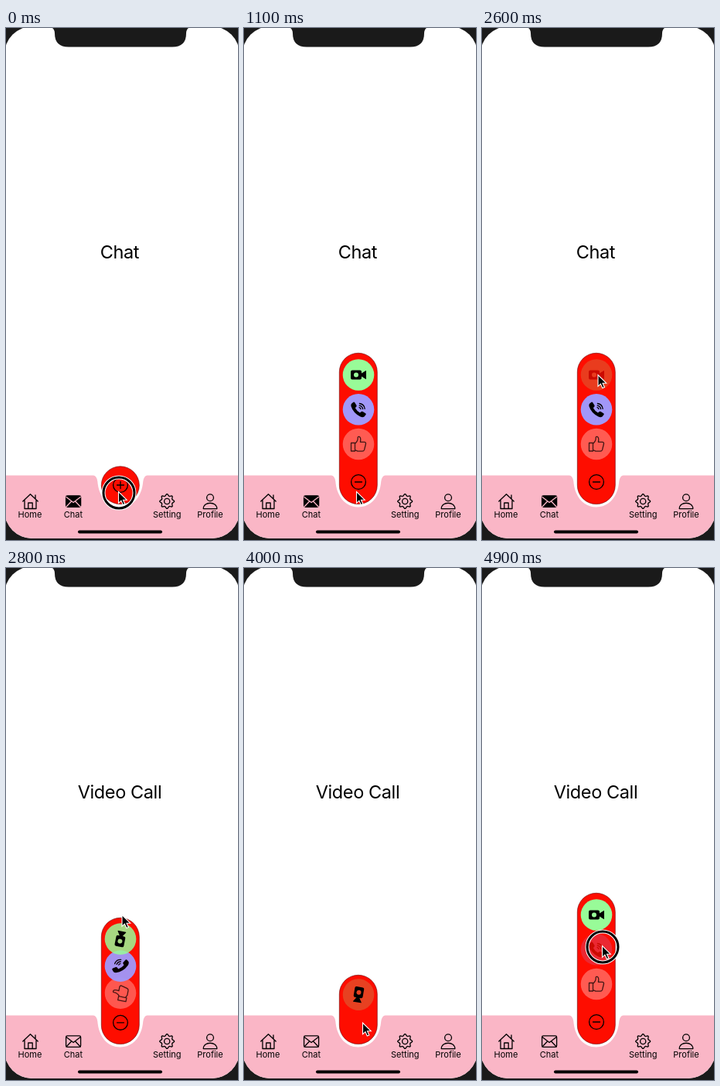
Recreate the animation shown at these times as an HTML page. Size 300x662 px, loop 5000 ms.

```html
<!DOCTYPE html>
<html lang="en">
<head>
<meta charset="utf-8">
<title>Expanding tab bar</title>
<style>
html, body { margin: 0; width: 100%; height: 100%; overflow: hidden; background: #1a1a1a; }
svg { display: block; width: 300px; height: 662px; font-family: Inter, sans-serif; text-anchor: middle; }
.line { fill: none; stroke: #000; stroke-width: 1.3; stroke-linejoin: round; stroke-linecap: round; }
.tab { font-size: 11px; }
#title { font-size: 23.5px; letter-spacing: -.4px; }
</style>
</head>
<body>
<svg viewBox="0 0 300 662">
  <defs>
    <clipPath id="screen"><rect x="-2" y="-2" width="304" height="662" rx="36"/></clipPath>
    <clipPath id="pillClip"><rect class="pill" x="123.3" width="49" rx="24.5"/></clipPath>
    <g id="camera">
      <path fill-rule="evenodd" d="M-8-6H2Q4-6 4-4V-2L9.5-5.5Q10-5.5 10-5V5Q10 5.5 9.5 5.5L4 2V4Q4 6 2 6H-8Q-10 6-10 4V-4Q-10-6-8-6ZM-3-3A3 3 0 0 0-3 3A3 3 0 0 0-3-3Z"/>
    </g>
    <g id="phone">
      <path d="M-9-7.5L-6.5-9.6Q-5.5-10-4.8-9L-2.6-5.6Q-2-4.5-2.8-3.6L-4.2-2Q-2 2.2 2 4.2L3.7 2.8Q4.6 2 5.6 2.7L9.2 5Q10.2 5.8 9.5 6.8L7.5 9.2Q5.5 10.5 2.5 9.2Q-6.5 5-9.5-4Q-10-6.3-9-7.5Z"/>
      <path class="line" d="M1-2.6Q2.6-2.2 3-.6M1.2-5.2Q5-4.5 5.6-.8M1.4-7.8Q7.4-7 8.2-1"/>
    </g>
    <g id="thumb" class="line" opacity=".75">
      <path d="M-9.5-1.5H-4.5V9H-9.5ZM-4.5-.5Q-.5-4-.8-8.5Q-.6-10 1-9.6Q3.6-8.6 2.4-2.6H8Q10-2.2 9.4 0L7.6 7.4Q7 9.2 5 9.2H-1L-4.5 7.6"/>
    </g>
  </defs>

  <g clip-path="url(#screen)">
    <rect x="-2" y="-2" width="304" height="664" fill="#fff"/>
    <path fill="#fab6c6" d="M-2 578.5H113Q117 578.5 118.3 586C120 607 132 619.5 147.8 619.5S175.6 607 177.3 586Q178.6 578.5 182.6 578.5H302V662H-2Z"/>
    <path fill="#1a1a1a" d="M56-2Q63 0 63 7Q63 24.5 81 24.5H215Q233 24.5 233 7Q233 0 240-2Z"/>
  </g>
  <text id="title" x="147" y="298"></text>

  <g class="line">
    <path d="M21.8 612L31.5 602.8L41.2 612M24 610.5V621.5H39V610.5M28.8 621.5V614H34.2V621.5M38 604V608"/>
    <g id="mail">
      <rect x="77.6" y="604.8" width="19" height="14.6" rx="1.8"/>
      <path id="flap" d="M78 606.5L87.1 613.5L96.2 606.5M78 619L84.6 612M96.2 619L89.6 612"/>
    </g>
    <path id="gear"/>
    <circle cx="208.2" cy="612" r="3.6"/>
    <circle cx="264" cy="607.2" r="4.4"/>
    <path d="M255.2 621.6C255.2 611.8 272.8 611.8 272.8 621.6Z"/>
  </g>
  <g class="tab">
    <text x="31" y="633">Home</text>
    <text x="87" y="633">Chat</text>
    <text x="208.3" y="633">Setting</text>
    <text x="264" y="633">Profile</text>
  </g>
  <rect x="93" y="649.5" width="109" height="4" rx="2"/>

  <rect class="pill" x="123.3" width="49" rx="24.5" fill="#fe0d00" stroke="#600" stroke-width=".6"/>
  <g clip-path="url(#pillClip)">
    <g id="minus" class="line" stroke-width="1.5"><circle r="9.4"/><path d="M-4.5 0H4.5"/></g>
    <g id="item2"><circle r="20.3" fill="#fff" opacity=".32"/><use href="#thumb"/></g>
    <g id="item1"><circle r="20.3" fill="#a197f8"/><use href="#phone"/></g>
    <g id="item0"><circle id="green" r="20.3" fill="#98fb98"/><use id="cameraIcon" href="#camera"/></g>
    <g id="plus" class="line" stroke-width="1.5"><circle r="9.4"/><path d="M-4.5 0H4.5M0-4.5V4.5"/></g>
  </g>

  <g id="ring" fill="none">
    <circle r="20" stroke="#fff" stroke-width="5"/>
    <circle r="20" stroke="#000" stroke-width="3"/>
  </g>
  <path id="cursor" stroke="#fff" stroke-width="1.1" d="M0 0V14.8L3.4 11.6L5.8 17L8.4 15.9L6 10.7H10.7Z"/>
</svg>
<script>
const $ = id => document.getElementById(id);
const LOOP = 5000, CLOSED_Y = 591;
const ramp = (v, a, b) => Math.min(1, Math.max(0, (v - a) / (b - a)));
const ease = x => x * x * (3 - 2 * x);
const mix = (a, b, k) => a + (b - a) * k;
const during = (t, a, b) => t >= a && t < b;

// [start, end, x, y]: each move eases from the previous place
const moves = [[0, 1, 145.5, 599.5], [1250, 1850, 144.5, 474], [1850, 2180, 150, 448.5],
  [2800, 3500, 153.5, 588], [4180, 4750, 155.5, 488.5]];
const presses = [[0, 90], [2400, 2560], [3640, 3830], [4800, 5000]];

function place(id, x, y, opacity = 1, angle = 0) {
  $(id).setAttribute('transform', `translate(${x} ${y}) rotate(${angle})`);
  $(id).setAttribute('opacity', opacity);
}

function cursorAt(t) {
  let [, , x, y] = moves[0];
  for (const [a, b, nx, ny] of moves) {
    const k = ease(ramp(t, a, b));
    x = mix(x, nx, k);
    y = mix(y, ny, k);
  }
  return [x, y];
}

function draw(t) {
  const video = t >= 2700;
  const open = ease(ramp(t, 40, 540)) - ease(ramp(t, 2650, 3150)) + ease(ramp(t, 3828, 4328));
  const top = mix(566.8, 420.3, open);
  for (const pill of document.querySelectorAll('.pill')) {
    pill.setAttribute('y', top);
    pill.setAttribute('height', 615.6 - top);
  }

  const shown = ramp(open, .3, .8);
  const dimVideo = mix(1, .2, ramp(t, 2400, 2500) - ramp(t, 2640, 2800));
  const dimPhone = mix(1, .2, ramp(t, 4800, 4890));
  const angle = 360 * open;
  place('item0', 148, mix(CLOSED_Y, 448.5, open), dimVideo * (video ? 1 : ramp(open, .1, .4)), angle);
  place('item1', 148, mix(CLOSED_Y, 493.3, open), dimPhone * shown, angle);
  place('item2', 148, mix(CLOSED_Y, 538, open), shown, angle);
  place('minus', 148, mix(CLOSED_Y, 587, open), shown);
  place('plus', 148, CLOSED_Y, video ? 0 : 1 - ramp(open, 0, .3));
  $('green').setAttribute('opacity', ramp(open, .1, .9));

  $('title').textContent = video ? 'Video Call' : 'Chat';
  $('mail').setAttribute('fill', video ? 'none' : '#000');
  $('flap').setAttribute('stroke', video ? '#000' : '#fab6c6');

  const [x, y] = cursorAt(t);
  place('cursor', x, y);
  place('ring', x + .5, y + 1.5, presses.some(([a, b]) => during(t, a, b)) ? 1 : 0);
}

// Eight-toothed gear outline
const teeth = Array.from({ length: 32 }, (_, i) => {
  const a = (i - 1.5) * Math.PI / 16 + (i % 2 ? .04 : -.04), r = i % 4 === 1 || i % 4 === 2 ? 9.4 : 7.2;
  return `${208.2 + r * Math.sin(a)} ${612 - r * Math.cos(a)}`;
});
$('gear').setAttribute('d', `M${teeth.join('L')}Z`);

function frame(now) {
  draw(now % LOOP);
  requestAnimationFrame(frame);
}
draw(0);
requestAnimationFrame(frame);
</script>
</body>
</html>
```
